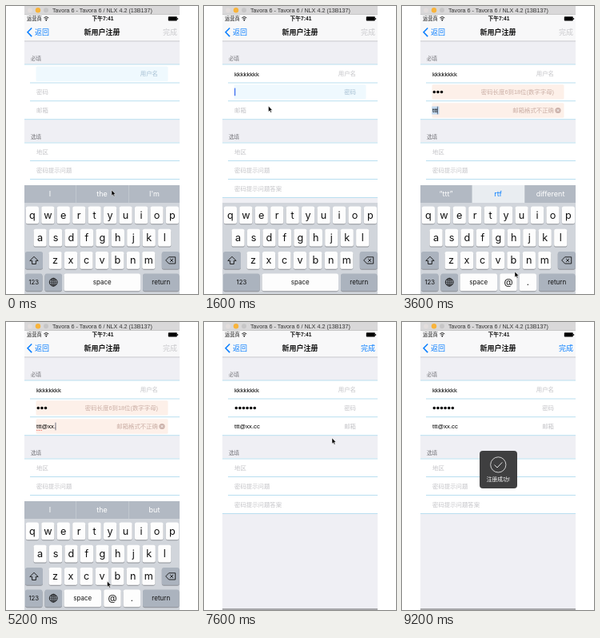
An HTML page that plays this animation: 240x360 px, repeating every 9600 ms.

```html
<!DOCTYPE html>
<html lang="zh-CN">
<head>
<meta charset="utf-8">
<style>
html, body { margin: 0; width: 100%; height: 100%; overflow: hidden; background: #fff; }
svg { display: block; width: 240px; height: 360px; }
text { font-family: "Liberation Sans", "Noto Sans CJK SC", "Noto Sans CJK", sans-serif; }
.key { font-family: Inter, "Liberation Sans", sans-serif; }
</style>
</head>
<body>
<svg id="stage" viewBox="0 0 240 360"></svg>
<script>
const STEP = 400, COUNT = 24;
const stage = document.getElementById('stage');
const BLUE = '#087eff', HINT = '#c3c3c7', LINE = '#b9dff0';

const rect = (x, y, w, h, fill, extra = '') =>
  `<rect x="${x}" y="${y}" width="${w}" height="${h}" fill="${fill}" ${extra}/>`;
const dot = (x, y, r, fill, extra = '') =>
  `<circle cx="${x}" cy="${y}" r="${r}" fill="${fill}" ${extra}/>`;
const path = (d, stroke, width = 1, extra = '') =>
  `<path d="${d}" fill="none" stroke="${stroke}" stroke-width="${width}" ${extra}/>`;
// y is the visual middle of the line
const text = (s, x, y, size, fill, anchor = 'start', extra = '') =>
  `<text x="${x}" y="${y + size * 0.36}" font-size="${size}" fill="${fill}" text-anchor="${anchor}" ${extra}>${s}</text>`;
const rule = (x, y) => rect(x, y, 217 - x, 1, LINE);

function windowBar() {
  return rect(23, 0, 194, 11, '#d9d8d9') + rect(23, 10.5, 194, 0.5, '#b8b8b8') +
    dot(30, 5.3, 2.9, '#e3dedd') + dot(40, 5.3, 3.2, '#f8b43c') + dot(50, 5.3, 3, '#c6c5c6') +
    text('Tavora 6 - Tavora 6 / NLX 4.2 (13B137)', 120.5, 5.3, 7.2, '#333', 'middle');
}

function header(done) {
  return rect(23, 11, 194, 33, '#f8f8f9') + rect(23, 43.6, 194, 0.7, '#b5b5b8') +
    text('运营商', 26, 16, 6.3, '#111') +
    path('M47.3 14.8Q50.3 12 53.3 14.8M48.5 16.2Q50.3 14.6 52.1 16.2', '#111', 0.9) +
    dot(50.3, 17.7, 0.9, '#111') +
    text('下午7:41', 121, 16, 6.7, '#111', 'middle', 'font-weight="700"') +
    rect(202.8, 13.3, 11, 5.2, '#000', 'rx="0.8"') + rect(214.2, 15, 0.9, 2, '#000') +
    path('M32.2 27.5L27 32.8L32.2 38.1', BLUE, 1.5) +
    text('返回', 36, 33, 9, BLUE) +
    text('新用户注册', 120, 33, 9, '#111', 'middle', 'font-weight="700"') +
    text('完成', 214, 33, 9, done ? BLUE : '#c9c9cc', 'end');
}

function form() {
  return rect(23, 44, 194, 316, '#efeff4') +
    rect(23, 73, 194, 69, '#fff') + rect(23, 170.5, 194, 69, '#fff') +
    text('必填', 31, 65.5, 6.6, '#77777c') + text('选填', 31, 163.5, 6.6, '#77777c') +
    rule(23, 72.5) + rule(30, 95.5) + rule(30, 118.2) + rule(23, 141.2) +
    rule(23, 170.5) + rule(30, 193) + rule(30, 216) + rule(23, 239) +
    text('地区', 38, 182.5, 7.4, HINT) + text('密码提示问题', 38, 205.5, 7.4, HINT) +
    text('密码提示问题答案', 38, 228.5, 7.4, HINT) +
    rect(23, 358, 194, 2, '#a8a8ab');
}

function row(y, name, width, body, active, error, caret) {
  if (!width && !active) return text(name, 38, y, 7.4, HINT);
  let out = '';
  if (active || error) out += rect(37.5, y - 9.2, 165, 18.4, error ? '#fdf0e9' : '#eff9fe', 'rx="1.5"');
  out += text(error || name, 190, y, 7.4, error ? '#caaea5' : active ? '#a5bfd2' : HINT, 'end');
  out += body;
  if (active && error) {
    out += dot(195, y, 3.6, '#cbb1aa') +
      path(`M193.6 ${y - 1.4}l2.8 2.8m0 -2.8l-2.8 2.8`, '#fff', 0.8);
  }
  if (active && caret) {
    out += width ? rect(37.5 + width, y - 4.8, 0.8, 9.6, '#4c5468') : rect(38, y - 4.8, 1.3, 9.6, '#4070f0');
  }
  return out;
}

const widths = { t: 2.14, '@': 7.82, x: 3.85, '.': 2.14, c: 3.85, k: 3.85 };
const measure = s => [...s].reduce((w, c) => w + widths[c], 0);

function fields(s) {
  const value = (str, y) => text(str, 38, y, 7.7, '#000');
  const dots = Array.from({ length: s.pass }, (_, i) => dot(40.3 + i * 4.6, 107.4, 1.75, '#000')).join('');
  const mail = (s.marked ? rect(37.3, 125.5, 9.2, 10, '#c3d9ef') : '') + value(s.mail, 130.5) +
    (s.focus === 2 && s.mail.length > 3 ? path('M38 135.3H45', '#f06a60', 0.9, 'stroke-dasharray="1 .5"') : '');
  const shortPass = s.pass > 0 && s.pass < 6;
  const badMail = s.mail && !s.mail.endsWith('cc');
  return row(84.8, '用户名', measure(s.user), value(s.user, 84.8), s.focus === 0, '', s.caret) +
    row(107.4, '密码', s.pass * 4.6, dots, s.focus === 1, shortPass && '密码长度6到18位(数字字母)', s.caret) +
    row(130.5, '邮箱', measure(s.mail), mail, s.focus === 2, badMail && '邮箱格式不正确', s.caret);
}

function key(x, y, w, label, size = 12.7, dark = false) {
  return rect(x, y + 0.9, w, 21.8, '#8d9096', 'rx="2.6"') +
    rect(x, y, w, 21.8, dark ? '#abb3be' : '#fdfdfd', 'rx="2.6"') +
    text(label, x + w / 2, y + 10.6, size, '#111', 'middle', 'class="key"');
}

function letters(row, x, y) {
  return [...row].map((c, i) => key(x + i * 19.45, y, 16.2, c)).join('');
}

function keyboard(s) {
  const secure = s.focus === 1, top = secure ? 246 : 224;
  let out = rect(23, top, 194, 360 - top, '#d1d5db');
  if (!secure) {
    const words = s.words;
    out += rect(23, 224, 194, 22, '#b2b9c3');
    if (s.marked) out += rect(87.5, 224, 65.5, 22, '#e9edf1');
    out += rect(87, 224, 0.7, 22, '#c8cdd4') + rect(153, 224, 0.7, 22, '#c8cdd4');
    out += [55, 120, 185.5].map((x, i) =>
      text(words[i], x, 234.5, 9, s.marked && i === 1 ? BLUE : '#fff', 'middle', 'class="key"')).join('');
  }
  out += letters('qwertyuiop', 24.8, 250.5) + letters('asdfghjkl', 34.5, 278.8) + letters('zxcvbnm', 53.5, 307);
  out += key(24, 307, 22, '', 8, true) + key(194.8, 307, 22, '', 8, true);
  out += path('M35 313.3L29.8 318.4H32.6V322.5H37.4V318.4H40.2Z', '#111', 0.9);
  out += path('M203.6 313.8H211.7V322H203.6L199.7 317.9ZM205.2 316l3.8 3.8m0 -3.8l-3.8 3.8', '#111', 0.9);
  const y = 334.5;
  if (secure) {
    out += key(24, y, 45.7, s.alt ? '.?123' : '123', 7.8, true);
  } else {
    out += key(24, y, 21.5, '123', 7.8, true) + key(48.5, y, 21.5, '', 8, true);
    out += dot(59.2, 345.2, 4.9, 'none', 'stroke="#111" stroke-width=".9"') +
      '<ellipse cx="59.2" cy="345.2" rx="2.2" ry="4.9" fill="none" stroke="#111" stroke-width=".7"/>' +
      path('M54.3 345.2H64.1M59.2 340.3V350.1M55.3 342.6H63.1M55.3 347.8H63.1', '#111', 0.7);
  }
  if (s.focus === 2) {
    out += key(72.5, y, 46.5, 'space', 8) + key(122.2, y, 21.5, '@', 11.5) + key(146.7, y, 21.3, '.', 11);
  } else {
    out += key(72.5, y, 95.5, 'space', 8);
  }
  return out + key(171, y, 45.5, 'return', 8, true);
}

function hud() {
  return rect(97, 161, 47, 47, '#3f3f40', 'rx="4"') +
    dot(120.3, 178.4, 9.6, 'none', 'stroke="#f4f4f4" stroke-width=".8"') +
    path('M115.5 178.6L119 182L125.3 175.4', '#f4f4f4', 0.9) +
    text('注册成功!', 120.3, 196.6, 6.8, '#fff', 'middle');
}

const pointer = ([x, y]) =>
  `<path transform="translate(${x} ${y})" d="M0 0V7.2L1.7 5.7L2.8 8.2L4 7.7L2.9 5.3H5Z" fill="#000" stroke="#fff" stroke-width=".5"/>`;

// pointer stops: step, x, y
const stops = [
  [0, 132, 230], [1, 130, 257], [2, 130, 258], [3, 107, 192], [4, 80.5, 125],
  [5, 101, 286], [6, 102, 288], [7, 84, 129], [8, 102, 288], [9, 141, 332],
  [10, 133, 344], [11, 122, 317], [12, 122, 318], [13, 126.5, 324], [14, 101, 317],
  [15, 101, 318], [16, 116, 297], [17, 120, 289], [18, 120, 290], [19, 160, 145],
  [20, 194, 39], [21, 203, 34]
];

const ramp = (i, start, per, max) => Math.max(0, Math.min(max, (i - start) * per));

function stateAt(i) {
  const focus = i < 4 ? 0 : i < 7 ? 1 : i < 16 ? 2 : i < 19 ? 1 : -1;
  const mailLength = i < 8 ? 0 : i < 10 ? 3 : Math.min(9, i - 6);
  const marked = i === 8 || i === 9;
  return {
    focus, marked,
    caret: i > 0,
    user: 'k'.repeat(ramp(i, 0, 3, 8)),
    pass: i < 16 ? ramp(i, 4, 2, 3) : Math.min(6, 3 + (i - 16) * 2),
    mail: 'ttt@xx.cc'.slice(0, mailLength),
    words: marked ? ['“ttt”', 'rtf', 'different'] : ['I', 'the', i > 9 ? 'but' : "I'm"],
    alt: i >= 16,
    done: i >= 18,
    success: i >= 22
  };
}

function draw(i) {
  const s = stateAt(i);
  stage.innerHTML = windowBar() + form() + header(s.done) + fields(s) +
    (s.focus >= 0 ? keyboard(s) : '') + (s.success ? hud() : '') +
    (stops[i] ? pointer(stops[i].slice(1)) : '');
}

let shown = -1;
function tick() {
  const i = Math.floor(performance.now() / STEP) % COUNT;
  if (i !== shown) draw(shown = i);
  requestAnimationFrame(tick);
}
tick();
</script>
</body>
</html>
```
